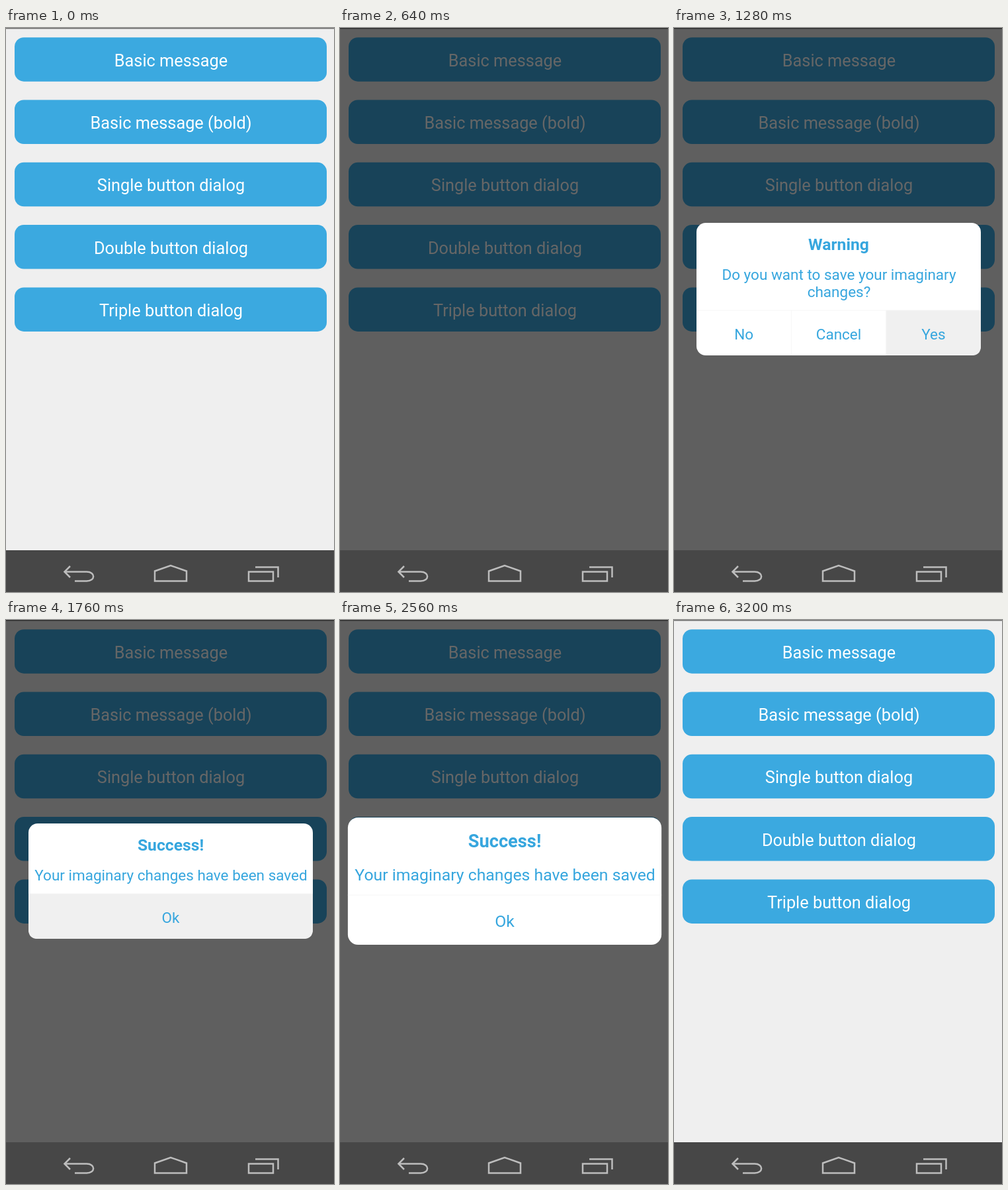
Write an HTML page that moves like this. It is 496 px wide and 851 px high and loops after 3360 ms.

```html
<!DOCTYPE html>
<html lang="en">
<head>
<meta charset="utf-8">
<title>Dialog demo</title>
<style>
  html, body { margin: 0; width: 100%; height: 100%; overflow: hidden; background: #efefef; }
  svg { display: block; width: 496px; height: 851px; }
  text { font-family: Roboto, sans-serif; text-anchor: middle; }
  #list text { font-size: 25.3px; fill: #fff; }
  #list rect { fill: #3ba9e0; }
  .dialog text { font-size: 22.5px; fill: #36a6de; }
  .dialog .title { font-size: 24.7px; font-weight: 700; }
  .icons { fill: none; stroke: #bdbdbd; stroke-width: 2.5; }
</style>
</head>
<body>
<svg viewBox="0 0 496 851">
  <rect width="496" height="851" fill="#efefef"/>
  <rect width="496" height="1" fill="#6a6a6a"/>
  <rect y="1" width="496" height="1" fill="#c4c4c4"/>
  <g id="list"></g>
  <rect id="dim" width="496" height="788" opacity="0"/>
  <g id="dialogs"></g>
  <rect y="788" width="496" height="63" fill="#474747"/>
  <g class="icons">
    <path d="M97 812L88.500 820.500L97 829M89 820.500H122C135.500 820.500 135.500 834.500 122 834.500H104"/>
    <path d="M225 834.500V819.500L249 811L273 819.500V834.500Z"/>
    <path d="M367 820.500H404V834.500H367ZM377 813.500H411.500V829"/>
  </g>
</svg>
<script>
const STEP = 160, LOOP = 3360;
const $ = id => document.getElementById(id);

function add(parent, tag, attrs, text) {
  const el = document.createElementNS('http://www.w3.org/2000/svg', tag);
  for (const key in attrs) el.setAttribute(key, attrs[key]);
  if (text) el.textContent = text;
  parent.append(el);
  return el;
}

const buttons = ['Basic message', 'Basic message (bold)', 'Single button dialog',
  'Double button dialog', 'Triple button dialog'].map((label, i) => {
  const y = 14.2 + i * 94.3;
  const box = add($('list'), 'rect', { x: 13, y, width: 472, height: 66.5, rx: 14 });
  add($('list'), 'text', { x: 249.5, y: y + 43.5 }, label);
  return box;
});

// Dialogs share a centre at (249, 394); the last button can be highlighted.
function makeDialog(height, title, lines, labels) {
  const top = 394 - height / 2, bottom = top + height;
  const rowTop = bottom - 68, cell = 430 / labels.length;
  const g = add($('dialogs'), 'g', { class: 'dialog', visibility: 'hidden' });
  add(g, 'rect', { x: 34, y: top, width: 430, height, rx: 14, fill: '#fff' });
  const left = 464 - cell, corner = labels.length > 1 ? 'H' + left : 'H48Q34 ' + bottom + ' 34 ' + (bottom - 14);
  const mark = add(g, 'path', {
    d: `M${left} ${rowTop}H464V${bottom - 14}Q464 ${bottom} 450 ${bottom}${corner}Z`,
    fill: '#f0f0f0'
  });
  add(g, 'path', { d: `M34 ${rowTop}H464`, stroke: '#f6f6f6' });
  for (let i = 1; i < labels.length; i++)
    add(g, 'path', { d: `M${34 + i * cell} ${rowTop}V${bottom}`, stroke: '#f6f6f6' });
  add(g, 'text', { class: 'title', x: 249, y: top + 40.5 }, title);
  lines.forEach((line, i) => add(g, 'text', { x: 249.5, y: top + 86 + i * 26 }, line));
  labels.forEach((label, i) =>
    add(g, 'text', { x: 34 + (i + .5) * cell, y: bottom - 24 }, label));
  return { g, mark };
}

const dialogs = {
  warning: makeDialog(200, 'Warning',
    ['Do you want to save your imaginary', 'changes?'], ['No', 'Cancel', 'Yes']),
  success: makeDialog(174, 'Success!',
    ['Your imaginary changes have been saved'], ['Ok'])
};

// [start ms, dim, dialog, scale, pressed]
const steps = [
  [0, 0],
  [480, 0, '', 0, true],
  [640, .6],
  [800, .6, 'warning', .75],
  [960, .6, 'warning', 1.05],
  [1120, .6, 'warning', 1],
  [1280, .6, 'warning', 1, true],
  [1440, .6, 'warning', 1.1],
  [1600, .6, 'success', .75],
  [1760, .6, 'success', 1, true],
  [2560, .6, 'success', 1.103],
  [2720, .6, 'success', .45],
  [2880, .3],
  [3040, 0]
];

function draw(now) {
  const t = Math.floor(now % LOOP / STEP) * STEP;
  const [, dim, shown, scale, pressed] = steps.findLast(s => s[0] <= t);
  $('dim').setAttribute('opacity', dim);
  buttons[4].style.fill = pressed && !shown ? '#2f87b3' : '';
  for (const name in dialogs) {
    const { g, mark } = dialogs[name], on = name === shown;
    g.setAttribute('visibility', on ? 'visible' : 'hidden');
    mark.setAttribute('opacity', pressed ? 1 : 0);
    if (on) g.setAttribute('transform', `translate(249 394) scale(${scale}) translate(-249 -394)`);
  }
}

let start;
function tick(now) {
  start ??= now;
  draw(now - start);
  requestAnimationFrame(tick);
}
draw(0);
requestAnimationFrame(tick);
</script>
</body>
</html>
```
